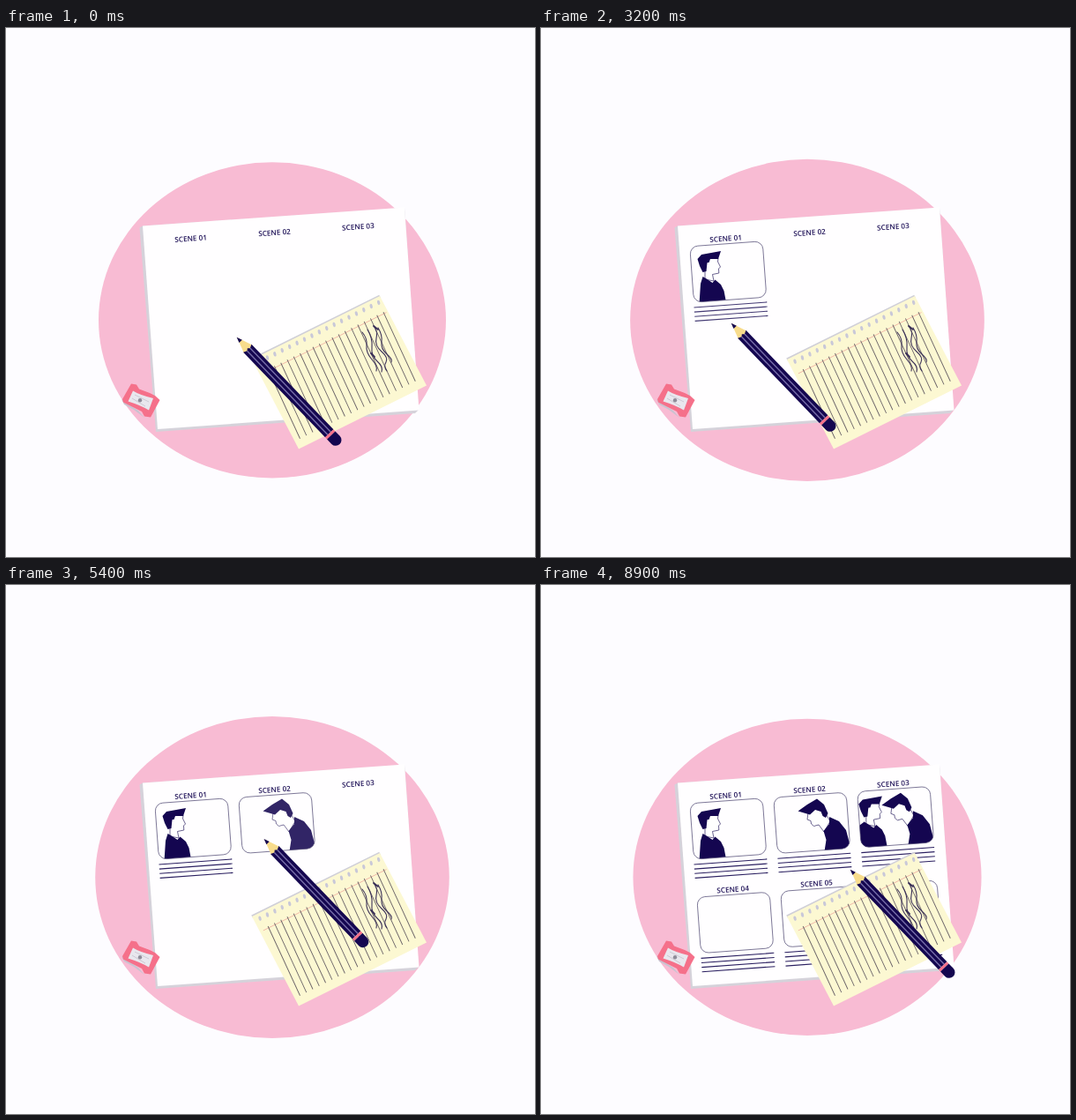
Recreate the animation shown at these times as an HTML page. Size 600 by 600 pixels, loop 9 s.

```html
<!DOCTYPE html>
<html lang="en">
<head>
<meta charset="utf-8">
<title>Storyboard</title>
<style>
  html, body { margin: 0; width: 100%; height: 100%; overflow: hidden; background: #fdfcff; }
  svg { display: block; width: 100vw; height: 100vh; }
  .label { font: 600 8.2px "Open Sans", "Noto Sans", sans-serif; text-anchor: middle; fill: #22155a; }
  .frame { fill: none; stroke: #4b4470; stroke-width: .7; }
  .rows { fill: none; stroke: #2a1f60; stroke-width: 1.1; }
  .ink { fill: #140650; }
  .face { fill: #fff; stroke: #2c2260; stroke-width: .7; stroke-linejoin: round; }
  .scrawl { fill: none; stroke: #3a3058; stroke-width: 1.1; stroke-linecap: round; }
</style>
</head>
<body>
<svg viewBox="0 0 600 600">
  <defs>
    <clipPath id="cell">
      <rect x="-41.3" y="-31.8" width="82.6" height="63.6" rx="9" transform="translate(212.3 276.5) rotate(-4.2)"/>
    </clipPath>
    <g id="upright">
      <path class="face" d="M190 261 L201 261 L200.5 265 L203.5 271 L201.5 273 L201.8 278 L194.5 279.5 L196 287 L186 285 L186 272Z"/>
      <path class="ink" d="M177.5 262 L182 257 L204 253 L201 262 L192 262 L190.5 266 L188.5 266 L187.5 276 L183.5 277 L180 270Z"/>
      <path class="ink" d="M183.5 282 L187 284 L194.5 289 L197.5 285.5 L204 291 L207.5 298 L210 311 L179.5 313 L181 290Z"/>
    </g>
    <g id="bowed" transform="translate(-94.9 6.7)">
      <path class="face" d="M303 258 L302 266 L306 267.5 L306.5 271 L309.5 273.5 L315 272 L321 280 L328 268 L321 256 L310 253Z"/>
      <path class="ink" d="M291.5 256.5 L302 249 L313 242.5 L321 249 L325.5 259 L323 264 L319.5 262 L317.5 257 L311 255 L305 260.5 L300 259Z"/>
      <path class="ink" d="M327 263 L338 268 L346 278 L350 293 L351 302 L321.5 302 L323.5 289 L320.5 279 L327 271Z"/>
    </g>
  </defs>

  <ellipse id="disc" cx="302" cy="331.4" fill="#f8bbd3"/>

  <path fill="#d5d2da" d="M151.5 226.5 L155 224.5 L452 204 L468 433 L464 437 L170 458Z"/>
  <path fill="#fffeff" d="M155 224.5 L452 203.5 L468.5 433.5 L172 455Z"/>
  <g id="board"></g>

  <g id="sharpener">
    <path fill="#c9c3d0" d="M131 421 L134 427 L145 433 L157 442 L150 434Z"/>
    <path fill="#f5708a" d="M132 421 L142 403.5 L148 404.5 L151 409.5 L163 414 L169 417 L174.5 422 L164 441.5 L157 440.5 L154 435 L142 429 L133 424.5Z"/>
    <path fill="#e9e7ee" d="M144 411.5 Q151 416 167 420 L162 433.5 Q153 428 138.5 423.5Z"/>
    <path fill="none" stroke="#c4c1cc" stroke-width=".8" d="M146 416 L162 424 M143 420 L158 429"/>
    <circle cx="152" cy="422.3" r="2.2" fill="#8f8c99"/>
  </g>

  <g transform="matrix(.895 -.444 .461 .883 279 376)">
    <rect y="-1.6" width="162" height="4" fill="#d0cfd8"/>
    <rect width="162" height="115" fill="#fcf8d2"/>
    <g id="holes" fill="#c9c8d8"></g>
    <path d="M4 20H160" stroke="#f0b3a4" stroke-width=".8"/>
    <path id="rules" stroke="#6b6468" stroke-width=".9"/>
  </g>
  <g class="scrawl">
    <path d="M404 345 Q410 352 409 360 T415 376 T420 389"/>
    <path d="M410 342 Q416 352 415 362 T421 378 T426 390"/>
    <path d="M417 338 Q422 344 420 352 T426 367 T431 379 T432 389"/>
    <path d="M422 340 Q427 348 426 356 T432 370 T437 379"/>
    <path d="M417 338 L422 342 M414 369 L418 373" stroke-width="1.8"/>
  </g>

  <g id="pencil">
    <g transform="rotate(46.1)">
      <path fill="#f8dc8c" d="M0 0 L18 -6.5 L20 0 L18 6.5Z"/>
      <path class="ink" d="M-.5 0 L6 -2.3 L6 2.3Z"/>
      <path class="ink" d="M17 -6.5 H151 V6.5 H17 L19 2.2 L17 0 L19 -2.2Z"/>
      <path stroke="#766da8" stroke-width="1.4" d="M19 -2.3H151 M19 2.3H151"/>
      <path fill="#f5708a" d="M151 -6.5H154V6.5H151Z"/>
      <path class="ink" d="M154 -6.5H161.5A6.5 6.5 0 0 1 161.5 6.5H154Z"/>
    </g>
  </g>
</svg>
<script>
  const LOOP = 9000, STEP = 100, PULSE = 735;
  const SECOND = 2950; // delay between the first and second scene
  const COL = [94.9, -6.7], ROW = [8, 106.4];
  const $ = id => document.getElementById(id);
  const range = n => [...Array(n).keys()];
  const clamp = v => Math.min(1, Math.max(0, v));

  // Each part of a cell has its own fade: [start, end]
  const always = [-2, -1], late = [7120, 7520], lateRows = [6950, 7430];
  const drawn = (delay, figures) => ({
    label: always, frame: [1650 + delay, 2000 + delay], art: [2100 + delay, 2500 + delay],
    rows: [2850 + delay, 3250 + delay], figures
  });
  const scenes = [
    drawn(0, ["upright"]),
    drawn(SECOND, ["bowed"]),
    { label: always, frame: late, art: late, rows: [7000, 7500], figures: ["upright", "bowed"] },
    ...range(3).map(() => ({ label: late, frame: late, art: late, rows: lateRows, figures: [] }))
  ];

  const tilt = (x, y) => `transform="translate(${x} ${y}) rotate(-4.2)"`;
  const rows = range(4).map(k => `M0 ${k * 5.15}H83`).join("");

  $("board").innerHTML = scenes.map((s, i) => {
    const c = i % 3, r = Math.floor(i / 3);
    const x = c * COL[0] + r * ROW[0], y = c * COL[1] + r * ROW[1];
    const pair = s.figures.length > 1;
    const uses = s.figures.map(id =>
      `<use href="#${id}" x="${pair && id === "upright" ? -7 : 0}"/>`).join("");
    const shoulder = pair ? '<path class="ink" d="M177 282 L166 290 L168 313 H180Z"/>' : "";
    return `<g transform="translate(${x} ${y})">
      <text class="label" data-part="label" ${tilt(209.8, 241.7)}>SCENE 0${i + 1}</text>
      <g data-part="art" clip-path="url(#cell)">${shoulder}${uses}</g>
      <rect class="frame" data-part="frame" x="-41.3" y="-31.8" width="82.6" height="63.6" rx="9" ${tilt(212.3, 276.5)}/>
      <path class="rows" data-part="rows" d="${rows}" ${tilt(173.5, 317)}/>
    </g>`;
  }).join("");

  const fades = [...$("board").children].flatMap((cell, i) =>
    [...cell.querySelectorAll("[data-part]")].map(el => ({ el, span: scenes[i][el.dataset.part] })));

  $("holes").innerHTML = range(17).map(k =>
    `<ellipse cx="${7 + k * 9.4}" cy="6" rx="1.6" ry="2.8" transform="rotate(12 ${7 + k * 9.4} 6)"/>`).join("");
  $("rules").setAttribute("d", range(19).map(k => `M${11 + k * 8.12} 18L${6.8 + k * 8.12} 105`).join(""));

  // Pencil tip: [time, x, y]
  const sketch = [
    [1500, 240, 244], [1650, 176, 250], [1750, 170.8, 281], [1900, 176, 310], [2050, 250, 305],
    [2200, 205, 256], [2350, 184, 285], [2500, 205, 300], [2650, 190, 270],
    [2800, 176, 316], [2930, 252, 314], [3050, 217, 331], [3200, 216, 335]
  ];
  const route = [
    [0, 262, 351], [900, 262, 351], [1300, 253, 312], ...sketch,
    [3450, 216, 335], [4250, 346, 300],
    ...sketch.map(([t, x, y]) => [t + SECOND, x + COL[0], y + COL[1]]),
    [6350, 311, 328], [6900, 351, 323], [LOOP, 351, 323]
  ];

  function tipAt(t) {
    const i = route.findIndex(p => p[0] > t);
    const [t0, x0, y0] = route[i - 1], [t1, x1, y1] = route[i];
    const k = (t - t0) / (t1 - t0);
    return [x0 + (x1 - x0) * k, y0 + (y1 - y0) * k];
  }

  function draw(t) {
    const radius = 199.4 - 2.4 * Math.cos(2 * Math.PI * t / PULSE);
    $("disc").setAttribute("rx", radius);
    $("disc").setAttribute("ry", radius * .909);
    for (const { el, span: [a, b] } of fades) el.setAttribute("opacity", clamp((t - a) / (b - a)));
    $("pencil").setAttribute("transform", `translate(${tipAt(t)})`);
  }

  const start = performance.now();
  function tick() {
    const t = (performance.now() - start) % LOOP;
    draw(Math.floor(t / STEP) * STEP);
    requestAnimationFrame(tick);
  }
  tick();
</script>
</body>
</html>
```
